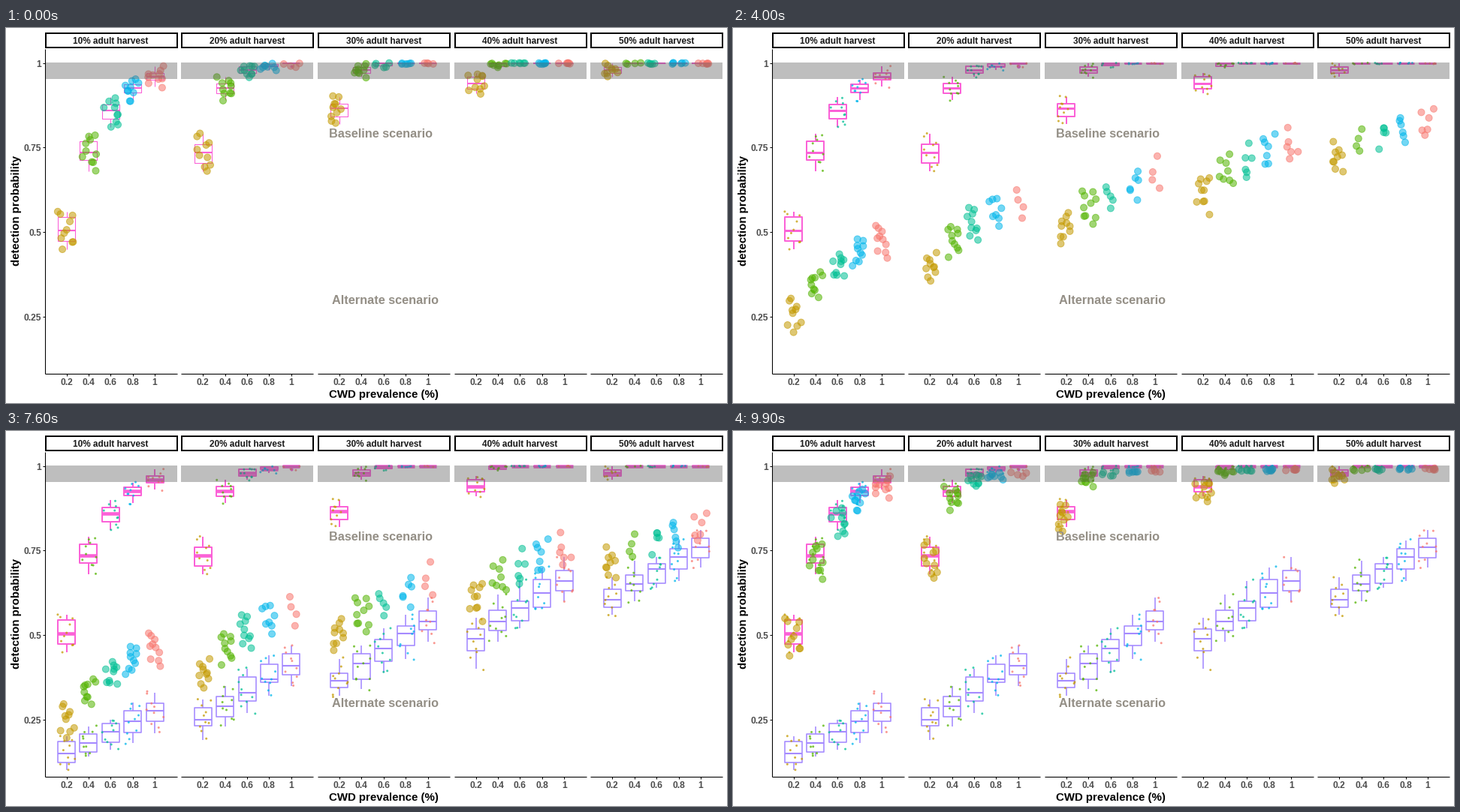
A matplotlib script for the animation above (10000 ms loop, 960 by 500 pixels).

```python
import numpy as np
import matplotlib.pyplot as plt
from matplotlib.animation import FuncAnimation
from matplotlib.collections import LineCollection, PolyCollection
from matplotlib.colors import to_rgba
from matplotlib.patches import Rectangle

W, H = 960, 500
PX = 0.72  # points per pixel at 100 dpi
HUES = ["#C49A00", "#53B400", "#00C094", "#00B6EB", "#F8766D"]
PINK, PURPLE = "#FB61D7", "#A58AFF"
LEFT, PITCH, WIDTH = 51, 181.7, 176
HOLD, MOVE_END, BACK, FRAMES = 16, 50, 67, 100
REPS = 10

plt.rcParams["font.family"] = "Liberation Sans"
plt.rcParams["font.weight"] = "bold"
rng = np.random.default_rng(7)


def center(panel, k):
    return LEFT + PITCH * panel + 29 + 29.4 * k


def ypix(prob):
    return 46 + (1 - np.asarray(prob, float)) * 451


def baseline(h, p):
    """Typical detection probability at harvest share h, prevalence p (%)."""
    return 1 - np.exp(-0.07 - 31.5 * p * h - 108 * p * h**5)


def alternate(h, p):
    rate = 0.129 + 0.895 * h + 2.41 * h * h
    return 1 - np.exp(-rate - (0.09 + 1.05 * h) * (p - 0.6))


def sample(mid, scale):
    """Replicates spread evenly about mid, in random order, to two decimals."""
    z = np.linspace(-1.5, 1.5, REPS) + rng.normal(0, 0.2, REPS)
    z = rng.permutation(z - np.median(z))
    return np.minimum(np.round(mid + scale * np.sqrt(mid * (1 - mid)) * z, 2), 1)


def jitter(cx, values):
    x = cx + rng.uniform(-11.7, 11.7, REPS)
    return np.column_stack([x, ypix(values + rng.uniform(-0.004, 0.004, REPS))])


# Replicates of every panel and prevalence in both scenarios
groups = [(panel, k) for panel in range(5) for k in range(5)]
centers, base_values, alt_values, start, end = [], [], [], [], []
for panel, k in groups:
    h, p, cx = 0.1 * (panel + 1), 0.2 * (k + 1), center(panel, k)
    centers.append(cx)
    base_values.append(sample(baseline(h, p), 0.08))
    alt_values.append(sample(alternate(h, p), 0.085))
    start.append(jitter(cx, base_values[-1]))
    end.append(jitter(cx, alt_values[-1]))
start, end = np.vstack(start), np.vstack(end)
hue = np.repeat([k for _, k in groups], REPS)
inside = start[:, 1] >= ypix(1)  # points above the scale limit are not drawn

fig = plt.figure(figsize=(W / 100, H / 100), dpi=100, facecolor="white")
ax = fig.add_axes([0, 0, 1, 1])
ax.set_xlim(-0.5, W - 0.5)
ax.set_ylim(H - 0.5, -0.5)
ax.axis("off")


def label(x, y, s, size, color="black", **kw):
    ax.text(x, y, s, fontsize=size * PX, color=color, zorder=6, **kw)


def line(xs, ys):
    ax.plot(xs, ys, color="black", lw=1.07 * PX, solid_capstyle="butt", zorder=5)


def dots(xy, colors, radius, edge, z):
    xy = np.asarray(xy, float).reshape(-1, 2)
    return ax.scatter(*xy.T, s=(2 * radius * PX) ** 2, c=colors,
                      linewidths=edge * PX, zorder=z)


def draw_boxes(samples, color, lw, mid, radius):
    """One set of box plots; returns its artists."""
    whiskers, bodies, medians, outliers = [], [], [], []
    for cx, values in zip(centers, samples):
        q1, med, q3 = np.percentile(values, [25, 50, 75])
        reach = 1.5 * (q3 - q1) + 1e-9
        near = (values >= q1 - reach) & (values <= q3 + reach)
        low, high = ypix(values[near].min()), ypix(values[near].max())
        outliers += [(cx, y) for y in ypix(values[~near])]
        q1, med, q3 = ypix([q1, med, q3])
        x0, x1 = cx - 11.5, cx + 11.5
        whiskers += [[(cx, low), (cx, q1)], [(cx, q3), (cx, high)]]
        bodies.append([(x0, q1), (x1, q1), (x1, q3), (x0, q3)])
        medians.append([(x0, med), (x1, med)])
    parts = [
        LineCollection(whiskers, colors=color, linewidths=lw * PX, zorder=2),
        PolyCollection(bodies, facecolors="white", edgecolors=color,
                       linewidths=lw * PX, zorder=2.1),
        LineCollection(medians, colors=color, linewidths=mid * PX, zorder=2.2),
    ]
    for part in parts:
        part.set_snap(True)
        ax.add_collection(part)
    return parts + [dots(outliers, color, radius, 0, 2.3)]


def tint(ks, alpha):
    return [to_rgba(HUES[k], alpha) for k in ks]


def small(xy, ks):
    return dots(xy, tint(ks, 0.75), 1.5, 0, 3)


def big(xy, ks):
    return dots(xy, tint(ks, 0.55), 4.5, 1, 3.1)


def show(artists, on):
    for a in artists:
        a.set_visible(on)


# Fixed furniture
for panel in range(5):
    x = LEFT + PITCH * panel
    ax.add_patch(Rectangle((x, 45.5), WIDTH, 22, fc="#595959", alpha=0.39, lw=0, zorder=4))
    ax.add_patch(Rectangle((x + 1, 6.5), WIDTH - 1, 19, fc="white", ec="black",
                           lw=2 * PX, zorder=5, snap=True))
    label(x + WIDTH / 2, 20.7, f"{10 * (panel + 1)}% adult harvest", 11.7, "#1A1A1A",
          ha="center")
    line([x, x + WIDTH], [460, 460])
    for k in range(5):
        cx = center(panel, k)
        line([cx, cx], [460, 463])
        label(cx, 476, f"{0.2 * (k + 1):.1g}", 12, "#4D4D4D", ha="center")
line([LEFT, LEFT], [27, 460])
for v in (0.25, 0.5, 0.75, 1):
    line([48, LEFT], [ypix(v)] * 2)
    label(46.5, ypix(v) + 5, f"{v:g}", 12, "#4D4D4D", ha="right")
label(502, 492.5, "CWD prevalence (%)", 15, ha="center")
label(13.5, 243, "detection probability", 15, ha="center", va="center", rotation=90)
label(499, 146, "Baseline scenario", 16.3, "#948F86", ha="center")
label(504.5, 367, "Alternate scenario", 16.3, "#948F86", ha="center")

# Animated layers
base_now = draw_boxes(base_values, PINK, 1.07, 2.1, 1.8)
base_mark = draw_boxes(base_values, PINK, 2, 3, 2.4)
base_heavy = draw_boxes(base_values, PINK, 2, 4.6, 1.9)
alt_now = draw_boxes(alt_values, PURPLE, 1.07, 2.1, 1.8)
alt_mark = draw_boxes(alt_values, PURPLE, 1.6, 2.1, 2.1)
base_dots = [small(start[inside], hue[inside])]
alt_dots = [small(end, hue)]
alt_extra = [big(end[~inside], hue[~inside])]
origin, shift = start[inside], (end - start)[inside]
movers = big(origin, hue[inside])


def update(n):
    at_base, at_alt, back = n <= HOLD, MOVE_END <= n < BACK, n >= BACK
    show(base_now, at_base)
    show(base_mark, not at_base and not back)
    show(base_heavy, back)
    show(base_dots, not at_base)
    show(alt_now + alt_extra, at_alt)
    show(alt_mark + alt_dots, back)
    if back:
        t = 1 - (n - BACK) / (FRAMES - BACK)
    else:
        t = np.clip((n - HOLD) / (MOVE_END - HOLD), 0, 1)
    movers.set_offsets(origin + shift * t)
    return [movers]


anim = FuncAnimation(fig, update, frames=FRAMES, interval=100, repeat=True, repeat_delay=0)
plt.show()
```
